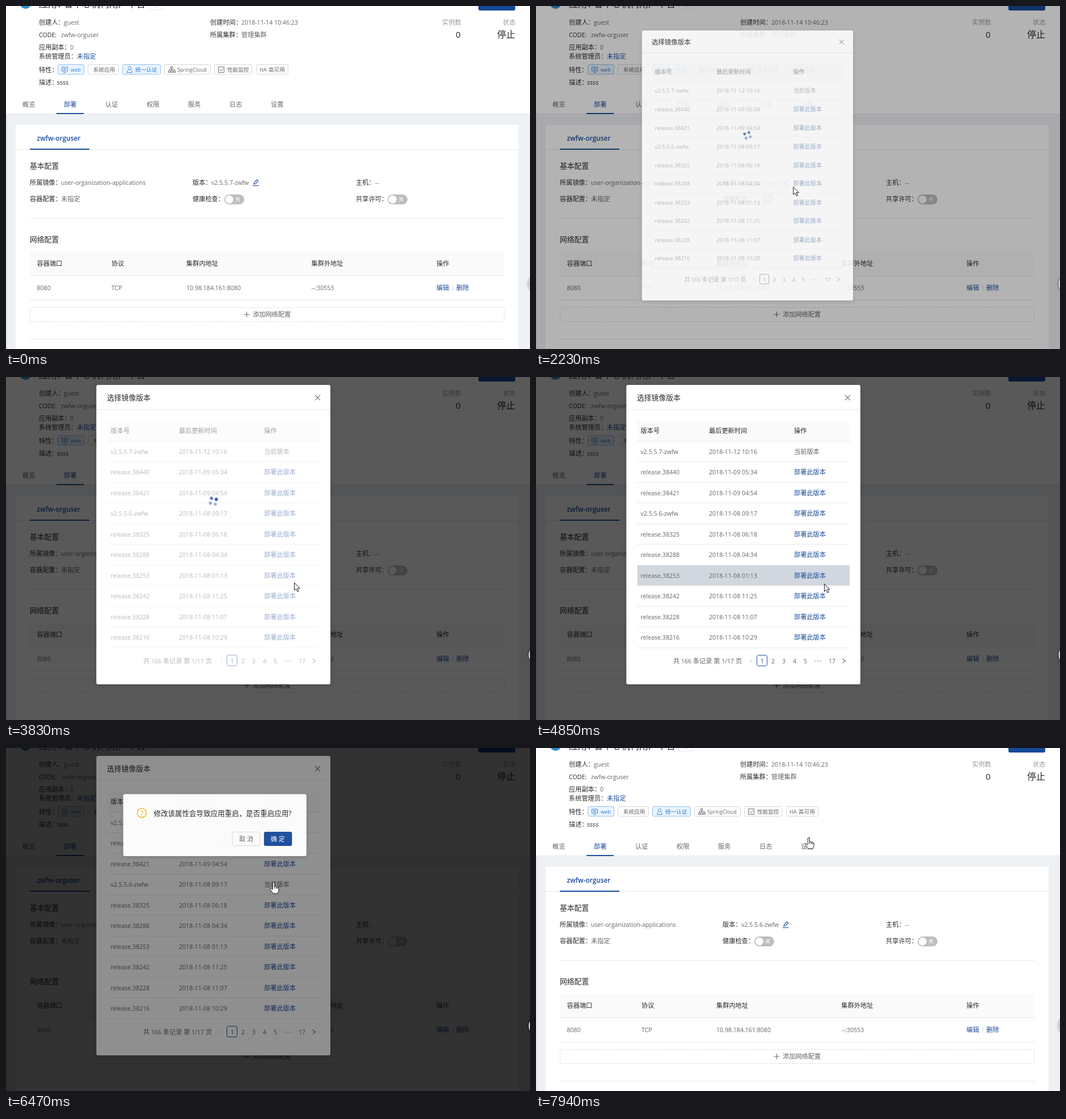
These frames come from a looping animation (924 px wide and 606 px high, 8 s). An HTML page:

```html
<!DOCTYPE html>
<html lang="zh">
<head>
<meta charset="utf-8">
<style>
html, body { margin: 0; width: 100%; height: 100%; overflow: hidden; background: #fff; }
svg { display: block; width: 100%; height: 100%; }
text { font-family: "Open Sans", "Noto Sans CJK SC", "Noto Sans CJK", sans-serif; }
.pop { filter: drop-shadow(0 2px 4px rgba(0,0,0,.15)); }
.orb { filter: drop-shadow(0 0 2px rgba(0,0,0,.6)); }
</style>
</head>
<body>
<svg id="stage" viewBox="0 0 924 606"></svg>
<script>
const BLUE = '#1d4d9c', DARK = '#2b2b2b', MID = '#666', PALE = '#999', RULE = '#e8e8e8', HOVER = '#d1d7df';

// Latin runs are set slightly smaller than the Chinese around them.
const text = (x, cy, s, fill = MID, size = 11.2, attrs = '') =>
  `<text x="${x}" y="${Math.round(cy + size * .36)}" fill="${fill}" font-size="${size}" ${attrs}>` +
  s.replace(/[ -~]+/g, m => `<tspan font-size="${size * .946}">${m}</tspan>`) + '</text>';
const rect = (x, y, w, h, fill, attrs = '') =>
  `<rect x="${x}" y="${y}" width="${w}" height="${h}" fill="${fill}" ${attrs}/>`;
const path = (d, stroke, attrs = '') => `<path d="${d}" fill="none" stroke="${stroke}" ${attrs}/>`;
const rule = (x1, x2, y, color = RULE) => rect(x1, y, x2 - x1, 1, color);
const group = (id, body, attrs = '') => `<g id="${id}" ${attrs}>${body}</g>`;
const field = (x, cy, label, vx, value, color) =>
  text(x, cy, label, DARK) + text(vx, cy, value, color);

function tag(x, w, tx, label, on, icon = '') {
  const ink = on ? '#2f7bd0' : MID;
  return rect(x + .5, 103.5, w - 1, 17, on ? '#eaf4ff' : '#fdfdfd', `rx="2" stroke="${on ? '#8fc0f2' : '#d9d9d9'}"`) +
    text(tx, 113, label, ink, 9.6) + path(icon, ink, 'stroke-width=".9"');
}

function toggle(x) {
  return rect(x, 333, 35, 17.6, '#bdbdbd', 'rx="8.8"') +
    `<circle cx="${x + 8.8}" cy="341.8" r="7.100" fill="#fff"/>` + text(x + 19, 342, '关', '#fff', 9.6);
}

const addButton = (line, ink) =>
  rect(42.5, 532.5, 836, 25, '#fff', `rx="3" stroke="${line}" stroke-dasharray="3 2"`) +
  path('M419.5 545h10M424.5 540v10', ink) + text(435, 545, '添加网络配置', ink);

function page() {
  let s = rect(0, 0, 924, 606, '#eef1f4') + rect(0, 0, 924, 190, '#fff') + rule(0, 924, 190) +
    rect(0, 191, 1.5, 415, '#dfe1e4') +
    '<circle cx="34.500" cy="-5" r="10" fill="#2a8fd0"/>' +
    text(58, -3.8, '应用：', DARK, 16) + text(102, -3.8, '省中心机构用户平台', DARK, 16) +
    rect(252.5, -12, 25, 18, '#fff', 'rx="3" stroke="#d9d9d9" stroke-dasharray="3 2"') +
    path('M265-5v7', PALE) + rect(833, -10, 65, 18, '#154a97', 'rx="3"') +
    field(58, 29, '创建人：', 102, 'guest') + field(58, 51, 'CODE:', 97, 'zwfw-orguser') +
    field(58, 73, '应用副本：', 113, '0') + field(58, 89, '系统管理员：', 125, '未指定', BLUE) +
    text(58, 113, '特性：', DARK) + field(58, 135, '描述：', 90, 'ssss', DARK) +
    field(360, 29, '创建时间：', 415, '2018-11-14 10:46:23') + field(360, 51, '所属集群：', 415, '管理集群') +
    text(769, 29, '实例数', PALE) + text(793, 50, '0', DARK, 16) +
    text(876, 29, '状态', PALE) + text(866, 50, '停止', DARK, 16);

  s += tag(91, 47, 114, 'web', true, 'M98.500 108h10v7h-10zM101 117.500h5M101 110.500h5M101 112.500h5') +
    tag(144, 55, 154, '系统应用') +
    tag(205, 68, 228, '统一认证', true, 'M218 107a2.700 2.700 0 1 0 .1 0M216.500 112.500q-3 1-3 5h9q0-4-3-5') +
    tag(279, 82, 302, 'SpringCloud', false, 'M290.500 107h3v3h-3zM286.500 114.500h3v3h-3zM291 114.500h3v3h-3zM295.500 114.500h3v3h-3zM292 110v4M288 114v-2h9v2') +
    tag(367, 67, 390, '性能监控', false, 'M374.500 107.500h10v10h-10zM376.500 112l2.500 3 4-5') +
    tag(441, 57, 463, '高可用') + text(447, 112.5, 'HA', MID, 9.6);

  '概览 部署 认证 权限 服务 日志 设置'.split(' ').forEach((name, i) => {
    s += text(29 + i * 73, 174, name, i == 1 ? BLUE : MID, 11.2, i == 1 ? 'font-weight="500"' : '');
  });
  s += rect(89, 189, 48, 2, BLUE) +
    rect(17, 210, 887, 400, '#fff') + rule(17, 904, 253) + rect(42, 252, 105, 2, BLUE) +
    text(54.5, 233, 'zwfw-orguser', BLUE, 12.5, 'font-weight="600"') +
    text(42, 282, '基本配置', DARK, 12.8) +
    field(42, 312, '所属镜像：', 97, 'user-organization-applications') +
    text(329, 312, '版本：', DARK) + text(362, 312, 'v2.5.5.7-zwfw', MID, 11.2, 'class="before"') +
    text(362, 312, 'v2.5.5.6-zwfw', MID, 11.2, 'class="after"') +
    path('M435 317.500h11M437 314.800l.5-2.800 5-5 2.200 2.200-5 5z', BLUE, 'stroke-width="1.1"') +
    field(617, 312, '主机：', 651, '--') +
    field(42, 341, '容器配置：', 97, '未指定') + text(329, 341, '健康检查：', DARK) + toggle(385) +
    text(617, 341, '共享许可：', DARK) + toggle(673) + rule(42, 879, 375) +
    text(42, 412, '网络配置', DARK, 12.8) + rect(42, 434, 837, 42, '#fafafa') + rule(42, 879, 476) +
    rect(42, 477, 837, 42, HOVER, 'id="portRow"') + rule(42, 879, 519);

  const cols = [54.5, 186, 318, 538.5, 759];
  ['容器端口', '协议', '集群内地址', '集群外地址', '操作'].forEach((h, i) => s += text(cols[i], 455, h, DARK));
  ['8080', 'TCP', '10.98.184.161:8080', '--:30553'].forEach((v, i) => s += text(cols[i], 498, v));
  return s + text(759, 498, '编辑', BLUE) + rect(787.5, 493, 1, 10, '#ddd') + text(794, 498, '删除', BLUE) +
    addButton('#d9d9d9', MID) + group('addHover', addButton(BLUE, BLUE)) + rule(42, 879, 588);
}

const ROW = 36.5;
const versions = [
  ['v2.5.5.7-zwfw', '12 10:16'], ['release.38440', '09 05:34'], ['release.38421', '09 04:54'],
  ['v2.5.5.6-zwfw', '08 09:17'], ['release.38325', '08 06:18'], ['release.38288', '08 04:34'],
  ['release.38253', '08 01:13'], ['release.38242', '08 11:25'], ['release.38228', '08 11:07'],
  ['release.38216', '08 10:29']];

function modal() {
  let list = rect(178.5, 77, 374.5, 36, '#fafafa') + rule(178.5, 553, 113) +
    text(184.5, 95, '版本号', DARK) + text(305, 95, '最后更新时间', DARK) + text(455, 95, '操作', DARK);
  versions.forEach(([name, date], i) => {
    const y = 131.5 + i * ROW;
    const link = c => text(455, y, '部署此版本', BLUE, 11.2, c);
    const current = c => text(455, y, '当前版本', MID, 11.2, c);
    list += rect(178.5, y - 18, 374.5, 36, HOVER, `id="row${i}" opacity="0"`) + rule(178.5, 553, Math.round(y + 17.5)) +
      text(184.5, y, name) + text(305, y, '2018-11-' + date) +
      (i == 0 ? current('class="before"') + link('class="after"') :
       i == 3 ? link('class="before"') + current('class="after"') : link(''));
  });
  list += text(242, 501.5, '共 166 条记录 第 1/17 页') + path('M382.500 498l-5 3.700 5 3.700', '#ccc') +
    rect(389.5, 491.5, 18, 19, '#fff', `rx="3" stroke="${BLUE}"`);
  [[399, '1'], [418, '2'], [437, '3'], [456, '4'], [475, '5'], [522, '17']].forEach(([x, n], i) =>
    list += text(x, 501.5, n, i ? MID : BLUE, 11.2, 'text-anchor="middle"'));
  [491.5, 497, 502.5].forEach(x => list += `<circle cx="${x}" cy="502" r="1.200" fill="#bbb"/>`);
  list += path('M540.500 498l5 3.700-5 3.700', MID, 'stroke-width="1.1"');

  const dots = [0, 1, 2, 3].map(i =>
    `<circle id="dot${i}" cx="6.200" r="2.900" fill="${BLUE}" transform="rotate(${i * 90})"/>`).join('');
  return rect(159.3, 14, 412.7, 529, '#fff', 'rx="3"') + text(178, 36, '选择镜像版本', DARK, 12.8) +
    path('M545 32l9 9m0-9l-9 9', '#777', 'stroke-width="1.1"') + rule(159.3, 572, 57) +
    group('list', list) + group('spin', dots);
}

const dialog = () =>
  rect(201, 78, 330, 112, '#fff', 'rx="3"') +
  '<circle cx="234.500" cy="112" r="8.200" fill="none" stroke="#faad14" stroke-width="1.400"/>' +
  text(234.5, 112, '?', '#faad14', 13, 'text-anchor="middle"') +
  text(256, 112, '修改该属性会导致应用重启，是否重启应用?', DARK, 12.8) +
  rect(397.5, 146.5, 50, 24.5, '#fff', 'rx="3" stroke="#d9d9d9"') + text(410, 159, '取 消') +
  rect(454.5, 146, 50.5, 25.5, '#1f4f9f', 'rx="3"') + text(467, 159, '确 定', '#fff');

const mask = id => rect(0, 0, 924, 606, '#000', `id="${id}"`);
const cursorStyle = 'fill="#fff" stroke="#1a1a2a" stroke-linejoin="round"';

document.getElementById('stage').innerHTML = page() + mask('mask') + group('modal', modal(), 'class="pop"') +
  mask('mask2') + group('dialog', dialog(), 'class="pop"') +
  '<circle class="orb" cx="937.500" cy="491" r="15" fill="#666" stroke="#fff" stroke-width="1.400"/>' +
  group('cursor',
    `<path id="arrow" d="M.5.5V14l3.100-2.800 2.300 5 2.300-1-2.300-4.900h4.200z" ${cursorStyle}/>` +
    `<path id="hand" d="M-1.500 11V1q0-2 1.500-2t1.500 2v5.500q3-1 3 1 2.500-1 2.500 1 2-.5 2 1.500v4l-2 5h-8l-4.500-6.500q-1-2.500 1-2.500l3 2.500M1.500 6.500v4M4.500 7.500v3M7 8.500v2.500" ${cursorStyle}/>`);

const $ = id => document.getElementById(id);
const before = document.querySelectorAll('.before'), after = document.querySelectorAll('.after');
const clamp = v => Math.max(0, Math.min(1, v));
const ramp = (t, from, to) => clamp((t - from) / (to - from));
const show = (el, on) => el.style.display = on ? '' : 'none';
const fade = (id, v) => $(id).setAttribute('opacity', v);
const hover = (t, from, to) => Math.min(ramp(t, from, from + 200), 1 - ramp(t, to, to + 300));

const route = [
  [510, 478, 578], [1290, 440, 306], [1370, 439, 305], [1440, 440, 305], [1610, 441, 306],
  [1760, 441, 306], [1910, 443, 311], [2080, 443, 311], [2680, 508, 363], [4640, 508, 363],
  [4850, 508, 365], [5310, 508, 365], [6000, 472, 238], [6860, 472, 238], [7080, 464, 205],
  [7320, 481, 159], [8000, 481, 159]];

function pointer(t) {
  const i = Math.max(1, route.findIndex(k => k[0] > t));
  const [t0, x0, y0] = route[i - 1], [t1, x1, y1] = route[i];
  const p = ramp(t, t0, t1), e = p * p * (3 - 2 * p);
  return [x0 + (x1 - x0) * e, y0 + (y1 - y0) * e];
}

function overLink(t, x, y) {
  if (t < 2120) return t > 1200 || y > 532 && y < 558;
  if (t < 6500) return x > 455 && x < 511 && y > 120 && Math.abs((y - 131.5 + ROW / 2) % ROW - ROW / 2) < 6;
  return y < 171;
}

// Popups grow out of the point that was clicked.
function zoom(id, maskId, t, open, ox, oy) {
  const grow = 1 - (1 - ramp(t, open, open + 300)) ** 3;
  const v = grow * (1 - ramp(t, 7690, 7935) ** 2);
  const s = .2 + .8 * v;
  show($(id), v > 0);
  $(id).setAttribute('transform', `translate(${ox} ${oy}) scale(${s}) translate(${-ox} ${-oy})`);
  fade(id, v);
  fade(maskId, .65 * Math.min(ramp(t, open + 25, open + 300), 1 - ramp(t, 7690, 7935)));
}

const rowHovers = [[6, 4640, 5490], [5, 5490, 5660], [4, 5660, 5820], [3, 5820, 6160]];

function draw(t) {
  const [x, y] = pointer(t), hand = overLink(t, x, y);
  show($('cursor'), t >= 510);
  $('cursor').setAttribute('transform', `translate(${x} ${y})`);
  show($('hand'), hand);
  show($('arrow'), !hand);

  const deployed = t >= 6160;
  before.forEach(el => show(el, !deployed));
  after.forEach(el => show(el, deployed));

  fade('addHover', hover(t, 590, 700));
  fade('portRow', hover(t, 720, 850));
  rowHovers.forEach(([i, from, to]) => fade('row' + i, hover(t, from, to)));

  zoom('modal', 'mask', t, 2080, 440, 312);
  zoom('dialog', 'mask2', t, 6260, 473, 240);

  const load = 1 - ramp(t, 4600, 4800);
  fade('list', 1 - .55 * load);
  fade('spin', load);
  $('spin').setAttribute('transform', `translate(365.6 219.5) rotate(${72 + (t - 2680) * .3})`);
  for (let i = 0; i < 4; i++) {
    const phase = (t / 1000 + 2.32 - i * .4) % 2;
    fade('dot' + i, .3 + .6 * (1 - Math.abs(phase - 1)));
  }
}

const start = performance.now();
(function tick() {
  draw((performance.now() - start) % 8000);
  requestAnimationFrame(tick);
})();
</script>
</body>
</html>
```
